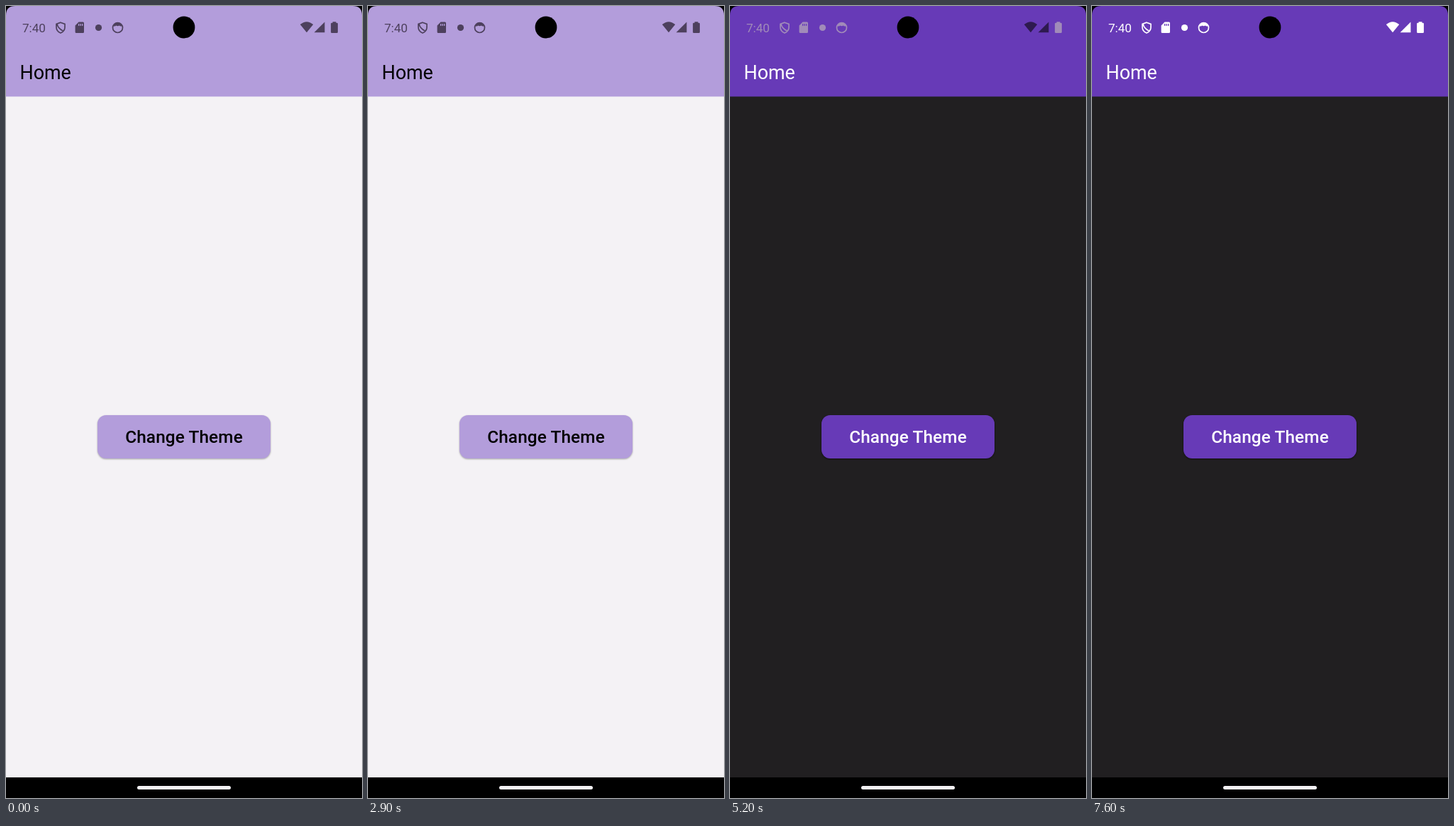
Recreate the animation shown at these times as an HTML page. Size 502 by 1115 pixels, loop 8 s.

```html
<!DOCTYPE html>
<html lang="en">
<head>
<meta charset="utf-8">
<title>Change Theme</title>
<style>
  html, body { margin: 0; width: 100%; height: 100%; overflow: hidden; background: #000; }
  svg {
    display: block; width: 100%; height: 100%;
    font-family: Roboto, sans-serif;
    animation: theme 8s step-end infinite;
  }

  /* Light theme, one step of half-tinted status icons, then dark theme. */
  @keyframes theme {
    0% { --primary: #b39ddb; --page: #f4f2f5; --text: #000; --status: #4d405d; --signal: #4d405d; --shadow: #0005; }
    65% { --primary: #673ab7; --page: #211f21; --text: #fff; --status: #a18bb9; --signal: #2e1a50; --shadow: #0008; }
    66.25%, 100% { --primary: #673ab7; --page: #211f21; --text: #fff; --status: #fff; --signal: #fff; --shadow: #0008; }
  }

  .primary { fill: var(--primary); }
  .page { fill: var(--page); }
  .text { fill: var(--text); }
  .status { fill: var(--status); }
  .signal { fill: var(--signal); }
  .line { fill: none; stroke: var(--status); stroke-width: 1.7; }
  .button { filter: drop-shadow(0 1.2px 1px var(--shadow)); }
  .title { font-size: 26.9px; }
  .label { font-size: 24.4px; font-weight: 500; letter-spacing: .12px; text-anchor: middle; }
  .clock { font-size: 17.1px; }
</style>
</head>
<body>
<svg viewBox="0 0 502 1115">
  <rect width="502" height="1115"/>
  <rect class="page" y="100" width="502" height="986"/>
  <path class="primary" d="M0 127.5V13Q0 0 13 0H489Q502 0 502 13V127.5Z"/>

  <text class="status clock" x="23" y="36.7">7:40</text>

  <!-- shield -->
  <path class="line" d="M77 23.2L83 25.4V30Q83 35.4 77 38Q71 35.4 71 30V25.4ZM72 25.2Q73 31.5 80.6 35.2"/>
  <!-- memory card -->
  <path class="status" fill-rule="evenodd" d="M102.5 22.5H108.6Q110 22.5 110 24V36.5Q110 38 108.6 38H99Q97.6 38 97.6 36.5V27.5ZM102 25V28H103.3V25ZM104.5 25V28H105.8V25ZM107 25V28H108.3V25Z"/>
  <circle class="status" cx="130.5" cy="30.5" r="4.6"/>
  <!-- face -->
  <circle class="line" cx="157.5" cy="30.5" r="7"/>
  <path class="status" d="M151.5 28Q153 23.5 157.5 23.5T163.5 28Q161.5 29.2 159.8 27.6Q157.5 29 155.2 27.6Q153.5 29.2 151.5 28Z"/>

  <circle cx="251" cy="30" r="15.4"/>

  <path class="signal" d="M424 37.3L414.8 26Q424 18.4 433.2 26ZM434.6 37.3H449.4V22.4Z"/>
  <path class="status" d="M460.6 22.2H465.4V23.8H466.6Q467.9 23.8 467.9 25.1V36.7Q467.9 38 466.6 38H459.4Q458.1 38 458.1 36.7V25.1Q458.1 23.8 459.4 23.8H460.6Z"/>

  <text class="text title" x="19.5" y="102.5">Home</text>

  <rect class="primary button" x="129" y="576" width="244" height="61" rx="12.2"/>
  <text class="text label" x="251" y="614.9">Change Theme</text>

  <rect x="185" y="1098" width="132" height="5" rx="2.5" fill="#f4f2f5"/>
</svg>
</body>
</html>
```
